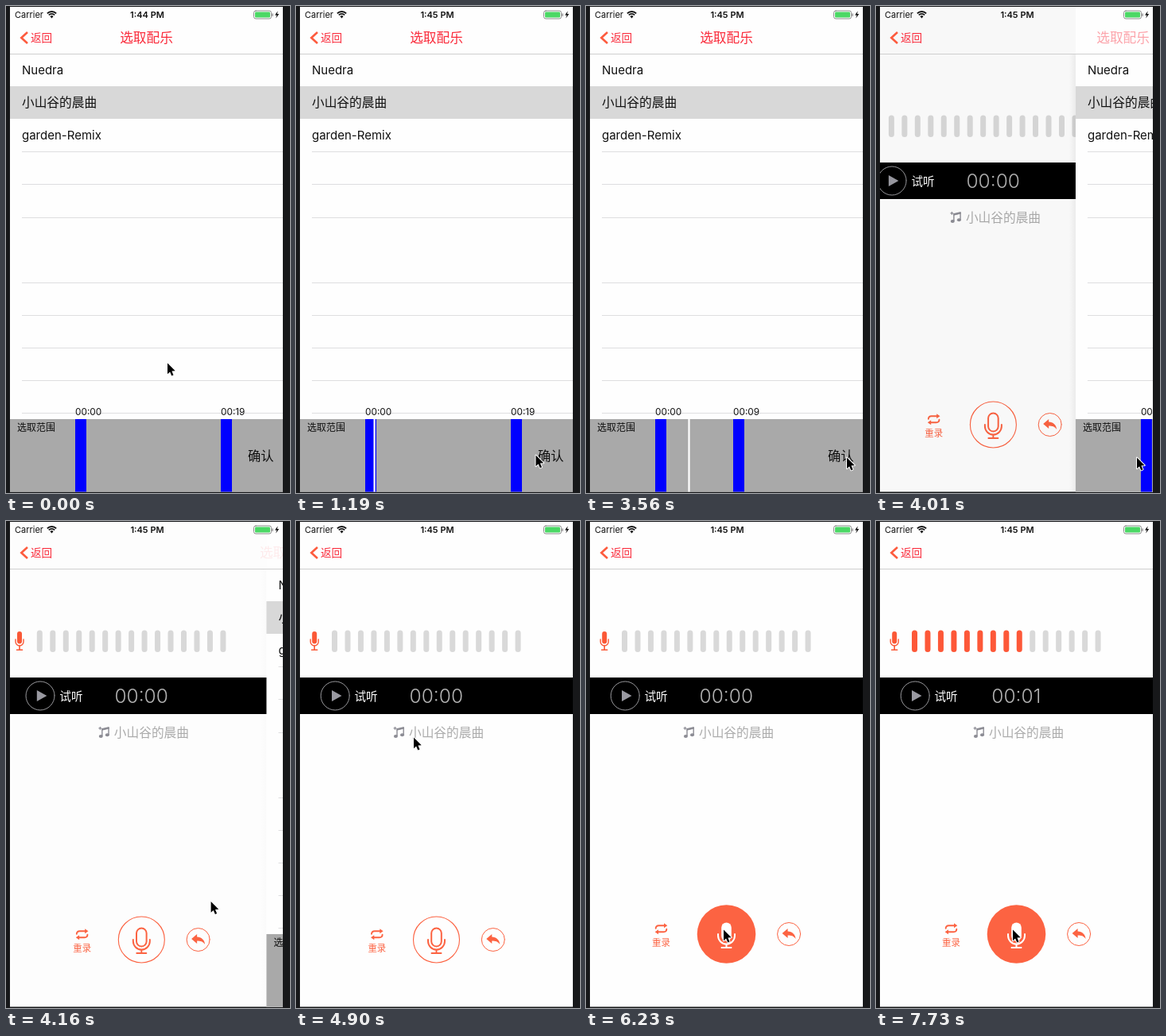
Recreate the animation shown at these times as an HTML page with a canvas. Size 357x613 px, loop 8000 ms.

```html
<!DOCTYPE html>
<html lang="zh-CN">
<head>
<meta charset="utf-8">
<title>选取配乐</title>
<style>
html, body { margin: 0; width: 100%; height: 100%; overflow: hidden; background: #17181a; }
canvas { display: block; }
</style>
</head>
<body>
<canvas id="stage" width="357" height="613"></canvas>
<script>
const ctx = document.getElementById('stage').getContext('2d');
const LOOP = 8000, STEP = 148.6;
const LEFT = 5, RIGHT = 348, WIDTH = RIGHT - LEFT;
const ORANGE = '#fc6342', RED = '#fa2b3b';
const LATIN = 'Inter, sans-serif';
const HAN = '"Noto Sans CJK SC", "Noto Sans CJK", sans-serif';
const SONG = '小山谷的晨曲';

// Keyframes: [step, value, ...]
const CURSOR = [[0, 202.5, 449], [8, 301, 565], [9, 299, 564], [14, 179.5, 560], [16, 179.5, 560],
  [22, 327.5, 568], [27, 327.5, 568], [30, 56, 223], [32, 56, 223], [33, 147.5, 272],
  [40, 172.5, 514], [50, 172.5, 514], [51, 171.5, 514]];
const HANDLE = [[8, 270], [14, 186], [15, 185]];
const POP = [[26, 0], [27, 0.717], [28, 0.94], [29, 0.99], [30, 1]];

function at(keys, k) {
  if (k <= keys[0][0]) return keys[0].slice(1);
  for (let i = 1; i < keys.length; i++) {
    const [a, ...from] = keys[i - 1], [b, ...to] = keys[i];
    if (k <= b) {
      const u = (k - a) / (b - a), e = u * u * (3 - 2 * u);
      return from.map((v, j) => v + (to[j] - v) * e);
    }
  }
  return keys[keys.length - 1].slice(1);
}

function rect(x, y, w, h, color) {
  ctx.fillStyle = color;
  ctx.fillRect(x, y, w, h);
}

function text(str, x, midY, size, color, { font = LATIN, weight = 400, align = 'left' } = {}) {
  ctx.font = `${weight} ${size}px ${font}`;
  ctx.textAlign = align;
  ctx.fillStyle = color;
  ctx.fillText(str, x, midY + size * (font === HAN ? 0.38 : 0.364));
}

const han = (str, x, midY, size, color, align) => text(str, x, midY, size, color, { font: HAN, align });

function stroke(color, width, draw, cap = 'round') {
  ctx.strokeStyle = color;
  ctx.lineWidth = width;
  ctx.lineCap = cap;
  ctx.beginPath();
  draw();
  ctx.stroke();
}

function fill(color, draw) {
  ctx.fillStyle = color;
  ctx.beginPath();
  draw();
  ctx.fill();
}

function poly(...p) {
  ctx.moveTo(p[0], p[1]);
  for (let i = 2; i < p.length; i += 2) ctx.lineTo(p[i], p[i + 1]);
}

function local(x, y, draw) {
  ctx.save();
  ctx.translate(x, y);
  draw();
  ctx.restore();
}

const circle = (x, y, r) => ctx.arc(x, y, r, 0, Math.PI * 2);
const clock = s => '00:' + String(s).padStart(2, '0');

function statusBar(k) {
  text('Carrier', 11, 11, 11, '#111');
  text(k < 4 ? '1:44 PM' : '1:45 PM', 177.5, 11, 11, '#111', { weight: 600, align: 'center' });
  for (const r of [8, 5.2]) {
    stroke('#111', 1.8, () => ctx.arc(57.5, 15, r, -Math.PI * 0.75, -Math.PI * 0.25), 'butt');
  }
  fill('#111', () => { ctx.moveTo(57.5, 15.5); ctx.arc(57.5, 15, 2.9, -Math.PI * 0.75, -Math.PI * 0.25); });
  stroke('#8c8c8c', 1, () => ctx.roundRect(311.5, 6, 22, 10, 2.5));
  fill('#4bd865', () => ctx.roundRect(313, 7.5, 19, 7, 1.2));
  fill('#8c8c8c', () => ctx.roundRect(334.4, 9.3, 1.4, 3.6, 0.7));
  fill('#111', () => poly(341.8, 6.2, 338, 11.6, 340.4, 11.6, 339.2, 15.6, 343.2, 10, 340.8, 10));
}

function navBar(pop) {
  stroke('#fd5b3e', 2.6, () => poly(27, 33, 19.3, 40, 27, 47), 'butt');
  han('返回', 31, 40, 13.6, RED);
  if (pop < 1) {
    ctx.globalAlpha = Math.min(1, (1 - pop) * 1.5);
    han('选取配乐', 176.5 + 187 * pop, 40, 16.7, RED, 'center');
    ctx.globalAlpha = 1;
  }
  rect(LEFT, 60, WIDTH, 1, '#cfcfcf');
}

function listPage(k) {
  rect(LEFT, 0, WIDTH, 613, '#fefefe');
  rect(LEFT, 101, WIDTH, 41, '#d8d8d8');
  for (let i = 3; i <= 11; i++) {
    if (i !== 6) rect(20, Math.round(60 + i * 41.1), RIGHT - 20, 1, '#dedee0');
  }
  text('Nuedra', 20, 80.5, 15, '#111');
  han(SONG, 20, 121.5, 15.7, '#111');
  text('garden-Remix', 20, 162.5, 15, '#111');

  rect(LEFT, 520, WIDTH, 93, '#a9a9a9');
  han('选取范围', 14, 530, 12, '#111');
  han('确认', 304, 566, 16.3, '#111');
  const [end] = at(HANDLE, k);
  for (const x of [87, end]) {
    rect(x, 520, 14, 93, '#0000ff');
    text(clock(Math.floor((x - 100.5) / 8.9)).replace('-2', '00'), x, 511, 11.8, '#111');
  }
  // The playhead jumps once a second.
  if (k >= 3) rect(97.5 + 10.3 * Math.floor((k - 3) / 7), 520, 2.2, 93, '#fff');
}

function smallMic() {
  local(23.2, 151, () => {
    fill('#fb5836', () => ctx.roundRect(-3, -12, 6, 15.5, 3));
    stroke('#fb5836', 1.4, () => { ctx.moveTo(-5, -2); ctx.arc(0, 1, 5, Math.PI, 0, true); ctx.lineTo(5, -2); });
    stroke('#fb5836', 1.6, () => { poly(0, 6, 0, 11); ctx.moveTo(-3.5, 11.3); ctx.lineTo(3.5, 11.3); });
  });
}

function recordMic(y, recording) {
  local(176.5, y, () => {
    const color = recording ? '#fff' : ORANGE;
    if (recording) fill(ORANGE, () => circle(0, 0, 36.8));
    else stroke(ORANGE, 1.1, () => circle(0, 0, 29));
    const body = () => ctx.roundRect(-6.3, -14.5, 12.6, 23, 6.3);
    if (recording) fill(color, body);
    else stroke(color, 2, body);
    stroke(color, 2, () => { ctx.moveTo(-10.5, 0); ctx.lineTo(-10.5, 2); ctx.arc(0, 2, 10.5, Math.PI, 0, true); ctx.lineTo(10.5, 0); });
    stroke(color, 2, () => { poly(0, 13, 0, 17); ctx.moveTo(-6, 17); ctx.lineTo(6, 17); });
  });
}

function redoButton(x, y) {
  local(x, y, () => {
    for (let i = 0; i < 2; i++) {
      stroke(ORANGE, 1.9, () => { ctx.moveTo(-6.8, -0.5); ctx.quadraticCurveTo(-6.8, -4, -3, -4); ctx.lineTo(4, -4); });
      fill(ORANGE, () => poly(3.5, -7, 7.8, -4, 3.5, -1));
      ctx.rotate(Math.PI);
    }
    han('重录', 0, 17, 11.4, ORANGE, 'center');
  });
}

function replyButton(x, y) {
  local(x, y, () => {
    stroke(ORANGE, 1, () => circle(0, 0, 14.5));
    fill(ORANGE, () => {
      poly(-8.5, -1, -1.5, -7, -1.5, -3.6);
      ctx.bezierCurveTo(4, -3.4, 8, 0, 8.5, 6);
      ctx.bezierCurveTo(6, 2.4, 3, 1.6, -1.5, 1.6);
      ctx.lineTo(-1.5, 5);
    });
  });
}

function musicNote() {
  const color = '#8d8d95';
  stroke(color, 1.4, () => poly(127, 271, 127, 262.5, 135.2, 260.5, 135.2, 269), 'butt');
  stroke(color, 2.6, () => poly(126.4, 262.6, 135.8, 260.3), 'butt');
  fill(color, () => ctx.ellipse(125.4, 271, 2.5, 2, 0, 0, 7));
  fill(color, () => ctx.ellipse(133.5, 269.3, 2.5, 2, 0, 0, 7));
  stroke(color, 1.2, () => { poly(123, 260.8, 126, 260.8); ctx.moveTo(124.5, 259.3); ctx.lineTo(124.5, 262.3); });
}

function recordPage(k) {
  rect(LEFT - 5, 0, WIDTH + 110, 613, '#fefefe');
  smallMic();
  const level = k < 51 ? 0 : k < 52 ? 5 : 9;
  for (let i = 0; i < 15; i++) {
    fill(i < level ? '#fd5838' : '#d9d9d9', () => ctx.roundRect(45 + i * 16.47, 137.5, 7, 27.5, 3.5));
  }
  rect(LEFT, 197, WIDTH + 110, 46, '#000');
  stroke('#98989c', 1, () => circle(49.2, 220, 18));
  fill('#9a9aa2', () => poly(45, 213, 57.5, 220, 45, 227));
  han('试听', 73.5, 220, 14.6, '#fff');
  text(clock(k < 51 ? 0 : 1), 176.3, 220, 24.5, '#b2b2b2', { weight: 300, align: 'center' });
  musicNote();
  han(SONG, 142, 266, 15.7, '#ababab');

  const recording = k >= 42, dx = recording ? 7.3 : 0, y = recording ? 520 : 527;
  redoButton(101.8 - dx, y - 6.8);
  recordMic(y, recording);
  replyButton(247.8 + dx, y);
}

function cursor(k) {
  const [x, y] = at(CURSOR, k);
  local(x, y, () => {
    const arrow = () => {
      poly(0.5, 0.5, 0.5, 14.2, 3.6, 11.4, 5.8, 16.4, 8, 15.4, 5.9, 10.5, 10.2, 10.3);
      ctx.closePath();
    };
    ctx.lineJoin = 'round';
    stroke('#fff', 2, arrow);
    fill('#000', arrow);
    ctx.lineJoin = 'miter';
  });
}

function draw(t) {
  const k = Math.floor((t + 15) / STEP);
  const [pop] = at(POP, k);
  const shift = WIDTH * pop;
  rect(0, 0, 357, 613, '#17181a');
  ctx.save();
  ctx.beginPath();
  ctx.rect(LEFT, 1, WIDTH, 610.5);
  ctx.clip();
  if (pop > 0) {
    local(-0.3 * WIDTH * (1 - pop), 0, () => recordPage(k));
    if (pop < 1) {
      rect(LEFT, 0, WIDTH, 613, `rgba(0,0,0,${0.08 * (1 - pop)})`);
      const edge = LEFT + shift, shade = ctx.createLinearGradient(edge - 8, 0, edge, 0);
      shade.addColorStop(0, 'rgba(0,0,0,0)');
      shade.addColorStop(1, `rgba(0,0,0,${0.2 * (1 - pop)})`);
      rect(edge - 8, 61, 8, 552, shade);
    }
  }
  if (pop < 1) local(shift, 0, () => listPage(k));
  statusBar(k);
  navBar(pop);
  cursor(k);
  ctx.restore();
}

function loop(now) {
  draw(now % LOOP);
  requestAnimationFrame(loop);
}
draw(0);
requestAnimationFrame(loop);
</script>
</body>
</html>
```
